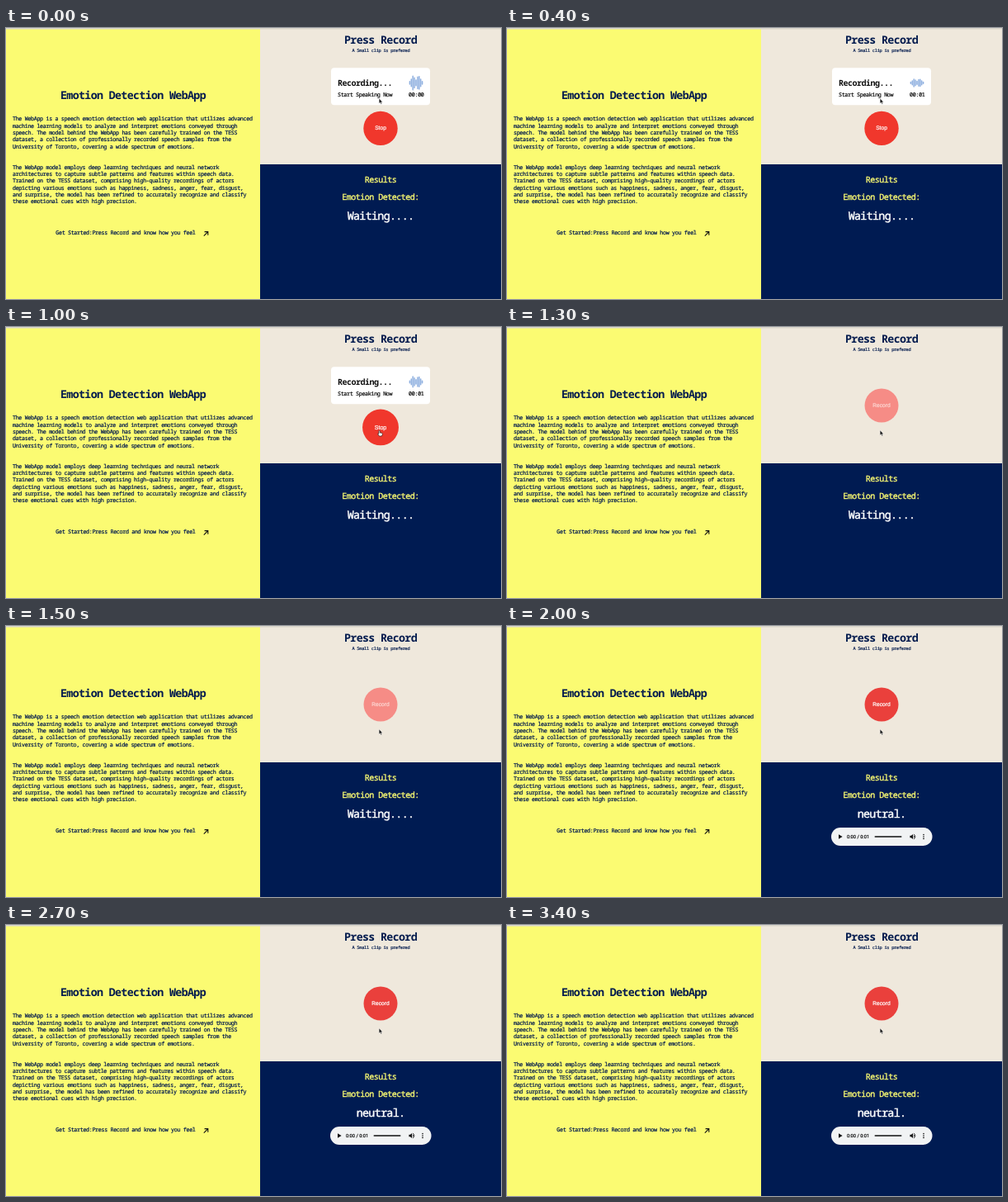
These frames come from a looping animation (600 px wide and 328 px high, 3.5 s). An HTML page:

```html
<!DOCTYPE html>
<html lang="en">
<head>
<meta charset="utf-8">
<title>Emotion Detection WebApp</title>
<style>
html, body { margin: 0; width: 100%; height: 100%; overflow: hidden; }
svg { display: block; width: 600px; height: 328px; }
text { font: 6.69px "Noto Sans Mono", "DejaVu Sans Mono", monospace; letter-spacing: -.05em;
  color: #031b4e; fill: currentColor; stroke: currentColor; stroke-width: .035em;
  text-rendering: geometricPrecision; white-space: pre; }
.mid { text-anchor: middle; }
text.big { font-size: 13.33px; }
text.sub { font-size: 10px; }
text.bold { font-weight: 700; stroke: none; }
text.tiny { font-size: 5.3px; }
text.yellow { color: #fbfb72; }
text.white { color: #fff; }
text.black { color: #111; }
text.label { font: 6.67px "Liberation Sans", Arial, sans-serif; letter-spacing: 0; color: #fff; }
text.clock { font: 5.7px Roboto, sans-serif; letter-spacing: 0; color: #111; }
#record { fill: #ea403c; }
#record.busy { fill: #f68c86; }
#record.busy text { color: #fcd6d2; }
</style>
</head>
<body>
<svg viewBox="0 0 600 328">
  <rect width="600" height="328" fill="#efe8dc"/>
  <rect width="308" height="328" fill="#fbfb72"/>
  <rect x="308" y="165" width="292" height="163" fill="#001b52"/>
  <rect width="600" height="1.5" fill="#d9d5cc"/>

  <text class="big bold mid" x="154" y="86">Emotion Detection WebApp</text>
  <g id="copy"></g>
  <text x="60.3" y="250.3">Get Started:Press Record and know how you feel</text>
  <path d="M239.8 251.6L244.6 246.8M240.6 246.6H244.8V250.8" fill="none" stroke="#111" stroke-width="1.1"/>

  <text class="big bold mid" x="454" y="19.3">Press Record</text>
  <text class="tiny mid" x="454.5" y="28.6">A Small clip is prefered</text>

  <g id="recording">
    <rect x="394" y="48.2" width="120" height="45" rx="4" fill="#fff"/>
    <text class="sub bold black" x="402" y="70.4">Recording...</text>
    <text class="black" x="402" y="82.7">Start Speaking Now</text>
    <text class="black" id="timer" x="506.5" y="82.7" text-anchor="end"></text>
    <path id="wave" stroke="#8fb0e0" stroke-width="1.5" stroke-linecap="round"/>
    <g id="stop">
      <circle r="20.7" fill="#f0372c"/>
      <text class="label mid" y="2">Stop</text>
    </g>
  </g>
  <g id="record">
    <circle cx="454" cy="95" r="20.5"/>
    <text class="label mid" x="454" y="97.4">Record</text>
  </g>

  <text class="sub yellow mid" x="454" y="187.3">Results</text>
  <text class="sub yellow mid" x="454" y="208">Emotion Detected:</text>
  <text class="big white mid" id="result" x="454" y="232.3"></text>

  <g id="player" fill="#111">
    <rect x="393" y="244" width="122.5" height="22" rx="11" fill="#f1f3f4"/>
    <path d="M402 252.2L406.6 255L402 257.8Z"/>
    <text class="clock" x="412" y="257.1">0:00 / 0:01</text>
    <rect x="445.5" y="254.2" width="33" height="1.6" rx=".8"/>
    <path d="M488.4 253.8H490L492 252V258L490 256.2H488.4Z"/>
    <path d="M493 253.5Q494.2 255 493 256.5M493 251.9Q496.8 255 493 258.1" fill="none" stroke="#111" stroke-width=".8"/>
    <circle cx="505" cy="252.6" r=".8"/>
    <circle cx="505" cy="255" r=".8"/>
    <circle cx="505" cy="257.4" r=".8"/>
  </g>

  <g id="cursor" stroke-linejoin="round">
    <path id="arrow" d="M0 0V6L1.4 4.8L2.4 6.9L3.3 6.5L2.4 4.4H4.2Z" fill="#111" stroke="#fff" stroke-width=".4"/>
    <path id="hand" d="M-.3 .7Q.5 -.3 1.1 .8V3L3.6 3.4Q4.3 3.6 4.1 4.6L3.3 7H.2L-1.6 4.4Q-1.5 3.5 -.3 4.3Z" fill="#fff" stroke="#111" stroke-width=".6"/>
  </g>
</svg>
<script>
const $ = id => document.getElementById(id);
const show = (id, on) => $(id).style.display = on ? "" : "none";
const clamp = v => Math.min(1, Math.max(0, v));
const ease = v => v * v * (3 - 2 * v);

const paragraphs = [[112.4, `The WebApp is a speech emotion detection web application that utilizes advanced
machine learning models to analyze and interpret emotions conveyed through
speech. The model behind the WebApp has been carefully trained on the TESS
dataset, a collection of professionally recorded speech samples from the
University of Toronto, covering a wide spectrum of emotions.`],
[170.6, `The WebApp model employs deep learning techniques and neural network
architectures to capture subtle patterns and features within speech data.
Trained on the TESS dataset, comprising high-quality recordings of actors
depicting various emotions such as happiness, sadness, anger, fear, disgust,
and surprise, the model has been refined to accurately recognize and classify
these emotional cues with high precision.`]];
$("copy").innerHTML = paragraphs.map(([y, copy]) => copy.split("\n")
  .map((line, i) => `<text x="8" y="${y + i * 8.3}">${line}</text>`).join("")).join("");

const bars = [3, 8, 15, 11, 6, 13, 14, 8, 3];

function draw(t) {
  const recording = t < 1300, done = t >= 1800;
  show("recording", recording);
  show("record", !recording);
  show("player", done);
  $("record").setAttribute("class", done ? "" : "busy");
  $("result").textContent = done ? "neutral." : "Waiting....";
  $("timer").textContent = t < 300 ? "00:00" : "00:01";

  const level = .85 + .25 * Math.cos(t / 800 * 2 * Math.PI);
  $("wave").setAttribute("d", bars.map((h, i) =>
    `M${489.4 + i * 1.9} ${66.4 - h * level / 2}v${h * level}`).join(""));

  const y = 85.3 + 39.7 * ease(clamp((t - 600) / 300));
  const hover = recording && y > 101;
  $("cursor").setAttribute("transform", `translate(452.2 ${y})`);
  show("arrow", !hover);
  show("hand", hover);
  const scale = 1 + .06 * ease(clamp((t - 750) / 200));
  $("stop").setAttribute("transform", `translate(454 121.4) scale(${scale})`);
}

const start = performance.now();
function tick() {
  draw(Math.floor((performance.now() - start) % 3500 / 100) * 100);
  requestAnimationFrame(tick);
}
tick();
</script>
</body>
</html>
```
